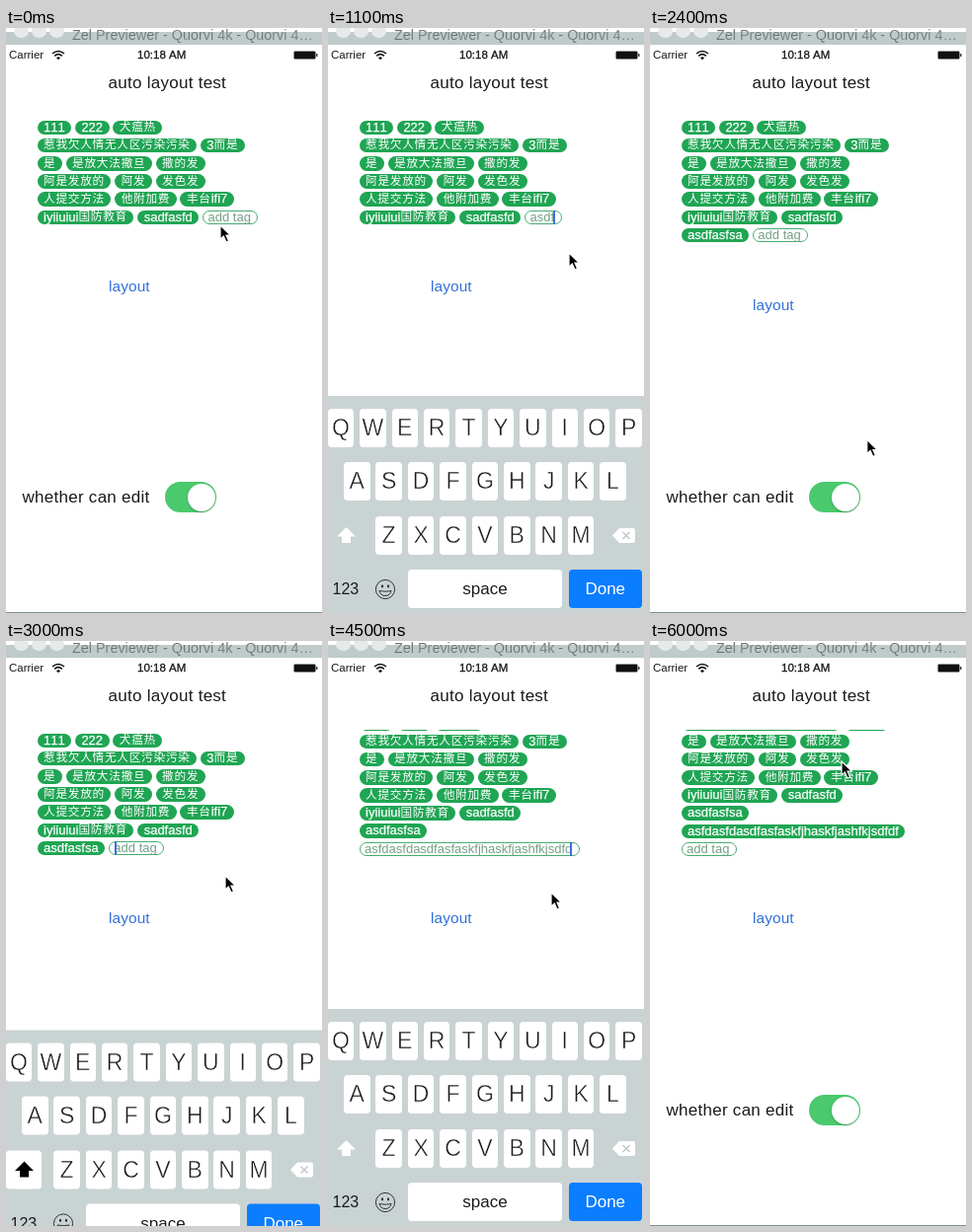
An HTML page that plays this animation: 320x593 px, repeating every 6.1 s.

```html
<!DOCTYPE html>
<html lang="en">
<head>
<meta charset="utf-8">
<title>auto layout test</title>
<style>
html, body { margin: 0; width: 100%; height: 100%; overflow: hidden; background: #fff; }
#stage { position: absolute; left: 0; top: 0; width: 320px; height: 593px; overflow: hidden; background: #fff;
  font: 17px "Liberation Sans", "Noto Sans CJK SC", "Noto Sans CJK", sans-serif; font-kerning: none; color: #1a1a1a; white-space: nowrap; }
#stage div, #stage svg { position: absolute; }
.bar { left: 0; top: 4px; width: 320px; height: 13px; background: #bfcbca; }
.light { top: -3px; width: 15px; height: 13px; border-radius: 50%; background: #e6ebea; }
.caption { left: 67px; top: -2px; font-size: 14.4px; line-height: 18px; color: #6b7272; -webkit-text-stroke: .2px #bfcbca; }
.status { top: 20px; font-size: 11.5px; line-height: 15px; }
.label { line-height: 20px; letter-spacing: .27px; }
#link { left: 104px; top: 252px; font-size: 15.4px; line-height: 20px; letter-spacing: .1px; color: #3270d4; }
.switch { left: 161px; top: 460px; width: 52px; height: 31px; border-radius: 16px; background: #4ac96d; }
.knob { right: 1.5px; top: 1.5px; width: 28px; height: 28px; border-radius: 50%; background: #fff; box-shadow: 0 1px 2px #0004; }
.foot { left: 0; top: 592px; width: 320px; height: 1px; background: #7f9292; }
#tags { left: 0; top: 90px; width: 320px; height: 132px; overflow: hidden; }
#list { left: 0; top: 0; }
#stage .row { left: 31.5px; display: flex; gap: 3.7px; }
#stage .tag { position: relative; box-sizing: border-box; height: 14.5px; padding: 0 6.5px; border-radius: 8px;
  background: #1fa553; color: #fff; font-size: 13px; line-height: 14.5px; -webkit-text-stroke: .25px #fff; white-space: pre; }
#stage .field { background: #fff; color: #74a085; padding: 0 6.5px 0 4.5px; border: 1px solid #46ad70; line-height: 12.5px; -webkit-text-stroke: 0; }
.cjk { position: relative; top: -.5px; font-size: 11.7px; letter-spacing: .7px; line-height: 1px; -webkit-text-stroke: 0; }
#caret { top: -1px; width: 2px; height: 14px; background: #3b6fdc; }
#stage .tag[hidden], #caret[hidden] { display: none; }
#board { left: 0; top: 373px; width: 320px; height: 220px; background: #cad3d4; }
.key { height: 39px; line-height: 39px; border-radius: 4px; background: #fff; text-align: center; }
.letter { width: 26.5px; font-size: 23px; -webkit-text-stroke: .5px #fff; }
</style>
</head>
<body>
<div id="stage">
  <div class="bar"></div>
  <div class="light" style="left:8px"></div>
  <div class="light" style="left:26px"></div>
  <div class="light" style="left:44px"></div>
  <div class="caption">Zel Previewer - Quorvi 4k - Quorvi 4…</div>

  <div class="status" style="left:3px">Carrier</div>
  <svg style="left:46px;top:22px" width="14" height="11" fill="none" stroke="#111" stroke-width="1.6">
    <path d="M1 4Q7 -1 13 4M3.2 6.4Q7 3 10.8 6.4"/><path d="M5 8.2Q7 6.4 9 8.2L7 10.3Z" fill="#111" stroke="none"/>
  </svg>
  <div class="status" style="left:133px;-webkit-text-stroke:.3px #111">10:18 AM</div>
  <svg style="left:290px;top:22px" width="27" height="11">
    <rect x="1.5" y="1.5" width="22" height="8" rx="1.5" fill="none" stroke="#444" stroke-width=".6"/>
    <rect x="2" y="2" width="21" height="7" fill="#111"/><rect x="24.2" y="4" width="1.2" height="3" fill="#111"/>
  </svg>

  <div class="label" style="left:103.5px;top:46px">auto layout test</div>
  <div id="tags"><div id="list"></div></div>
  <div id="link">layout</div>
  <div class="label" style="left:16.5px;top:466px">whether can edit</div>
  <div class="switch"><div class="knob"></div></div>
  <div class="foot"></div>

  <div id="board">
    <div class="key" id="shift" style="left:0;top:121.5px;width:36px"></div>
    <svg style="left:8px;top:132px" width="21" height="19"><path id="arrow" d="M10.5 1L20 10.5H15V17H6V10.5H1Z"/></svg>
    <svg style="left:287px;top:132.5px" width="26" height="18">
      <path d="M8 1H22Q24 1 24 3V14Q24 16 22 16H8L1 8.5Z" fill="#fff"/>
      <path d="M11.5 5L18.5 12M18.5 5L11.5 12" stroke="#c3cccd" stroke-width="1.6"/>
    </svg>
    <div style="left:4.5px;top:186px;font-size:16px;line-height:20px">123</div>
    <svg style="left:46px;top:184px" width="24" height="24" fill="none" stroke="#222" stroke-width=".9">
      <circle cx="12" cy="12" r="9.6"/><path d="M6 13.5Q12 15 18 13.5Q17 18.5 12 18.5T6 13.5Z"/>
      <g fill="#222" stroke="none"><ellipse cx="9" cy="8.8" rx="1" ry="1.6"/><ellipse cx="15" cy="8.8" rx="1" ry="1.6"/></g>
    </svg>
    <div class="key" style="left:81px;top:175.5px;width:156px">space</div>
    <div class="key" style="left:243.5px;top:175.5px;width:74.5px;background:#0b7dff;color:#fff">Done</div>
  </div>

  <svg id="pointer" style="left:-2px;top:-2px" width="16" height="22">
    <path d="M2 2V16.2L5.3 13L8 19L10.6 17.9L8 12.1H12.4Z" fill="#000" stroke="#fff" stroke-width="1.2"/>
  </svg>
</div>
<script>
const $ = id => document.getElementById(id);
const LOOP = 6100, STEP = 100, ROW = 18.15;
const SHORT = 'asdfasfsa';
const LONG = 'asfdasfdasdfasfaskfjhaskfjashfkjsdfdf';

function add(parent, cls, html = '') {
  const el = document.createElement('div');
  el.className = cls;
  el.innerHTML = html;
  return parent.appendChild(el);
}

// Tag list
const addTag = (row, text) =>
  add(row, 'tag', text.replace(/[\u4e00-\u9fff]+/g, '<span class="cjk">$&</span>'));

const rows = [
  '111 222 犬瘟热',
  '惹我欠人情无人区污染污染 3而是',
  '是 是放大法撒旦 撒的发',
  '阿是发放的 阿发 发色发',
  '人提交方法 他附加费 丰台ifi7',
  'iyiiuiui国防教育 sadfasfd',
  '', '', ''
].map((line, i) => {
  const row = add($('list'), 'row');
  row.style.top = 3.75 + i * ROW + 'px';
  if (line) line.split(' ').forEach(text => addTag(row, text));
  return row;
});
const shortTag = addTag(rows[6], SHORT);
const longTag = addTag(rows[7], LONG);
const field = add(rows[5], 'tag field', '<span></span>');
const input = field.firstChild;
const caret = add(field, '');
caret.id = 'caret';

// Letter keys: left edge and top of each row
[['QWERTYUIOP', -.3, 12.5], ['ASDFGHJKL', 16, 67], ['ZXCVBNM', 48.4, 121.5]].forEach(([keys, x, y]) =>
  [...keys].forEach((k, i) => {
    const key = add($('board'), 'key letter', k);
    key.style.left = x + i * 32.4 + 'px';
    key.style.top = y + 'px';
  }));

// Tracks: time, then values
const pointer = [
  [0, 217, 200], [300, 217, 204], [600, 244, 228], [1300, 244, 228], [1800, 285, 557],
  [2200, 285, 557], [2700, 122, 208], [2800, 128, 210], [3000, 222, 238], [3300, 226, 255],
  [4800, 226, 255], [5300, 262, 563], [5500, 262, 563], [6000, 194, 122]
];
const board = [
  [400, 220], [500, 110], [600, 22.5], [700, 0], [2100, 0], [2200, 60], [2300, 180], [2400, 220],
  [2800, 220], [2900, 110], [3000, 21.5], [3100, 0], [5400, 0], [5500, 60], [5600, 180], [5700, 220]
];
const scroll = [[4200, 0], [4400, 17.2], [5400, 17.2], [5600, 35.3]];
const typing = [[900, 0], [1300, 9], [2100, 9], [2101, 0], [3230, 0], [3900, 19], [4500, 36], [4700, 36], [4800, 37], [5400, 37], [5401, 0]];

function at(track, t) {
  const i = track.findIndex(p => p[0] > t);
  if (i < 0) return track[track.length - 1].slice(1);
  if (i === 0) return track[0].slice(1);
  const a = track[i - 1], b = track[i], k = (t - a[0]) / (b[0] - a[0]);
  return a.slice(1).map((v, j) => v + (b[j + 1] - v) * k);
}

function render(t) {
  const second = t >= 2200, third = t >= 5500;
  const typed = (second ? LONG : SHORT).slice(0, Math.floor(at(typing, t)[0] + .01));
  const focused = t >= 400 && !third && !(second && t < 2800);
  const wrapped = typed.length > (second ? 25 : 8);
  const line = third ? 8 : (second ? 6 : 5) + wrapped;

  shortTag.hidden = !second;
  longTag.hidden = !third;
  if (field.parentNode !== rows[line]) rows[line].append(field);
  input.textContent = typed || 'add tag';
  caret.hidden = !focused;
  caret.style.left = (typed ? input.offsetWidth + 2.5 : 5) + 'px';

  $('list').style.top = -at(scroll, t)[0] + 'px';
  $('link').style.top = 252 + (line > 5 ? 18.5 : 0) + 'px';
  $('board').style.transform = `translateY(${at(board, t)[0]}px)`;
  $('shift').style.visibility = typed ? 'hidden' : 'visible';
  $('arrow').setAttribute('fill', typed ? '#fff' : '#000');
  const [x, y] = at(pointer, t);
  $('pointer').style.transform = `translate(${x}px, ${y}px)`;
}

let shown = -1;
const start = performance.now();
function tick() {
  const t = Math.floor((performance.now() - start) % LOOP / STEP) * STEP;
  if (t !== shown) render(shown = t);
  requestAnimationFrame(tick);
}
tick();
</script>
</body>
</html>
```
